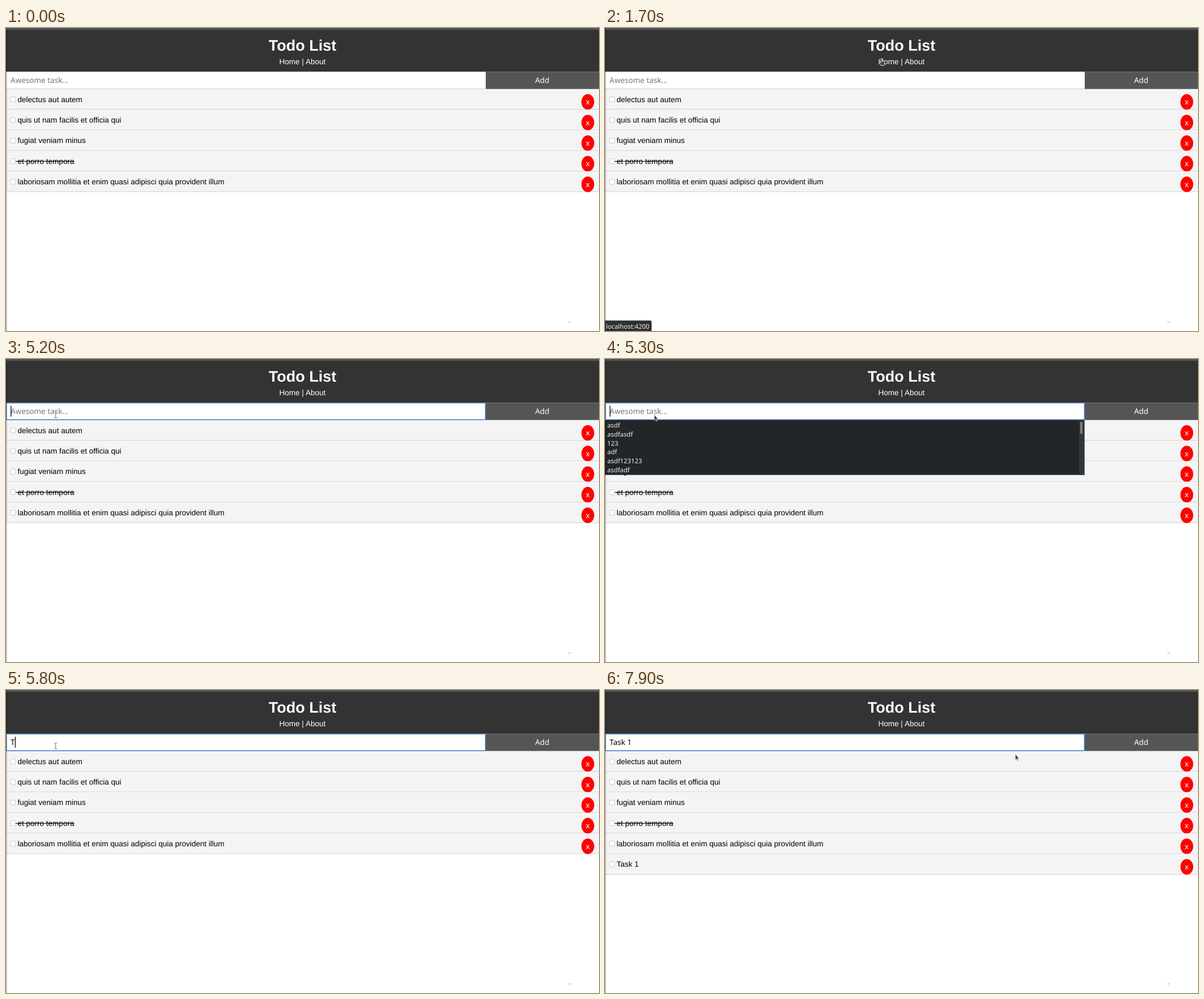
An HTML page for the animation above (8000 ms loop, 1047 by 535 pixels).

```html
<!DOCTYPE html>
<html lang="en">
<head>
<meta charset="utf-8">
<title>Todo List</title>
<style>
  html, body { margin: 0; width: 100%; height: 100%; overflow: hidden; background: #fff; }
  svg { display: block; width: 1047px; height: 535px; }
  text { text-rendering: geometricPrecision; white-space: pre; }
  .arial { font: 13.52px "Liberation Sans", Arial, sans-serif; }
  .title { font: bold 27px "Liberation Sans", Arial, sans-serif; }
  .noto { font: 13.5px "Noto Sans", "Open Sans", sans-serif; }
  .small { font: 11.3px "Noto Sans", "Open Sans", sans-serif; }
  .mid { text-anchor: middle; }
</style>
</head>
<body>
<svg viewBox="0 0 1047 535">
  <defs>
    <linearGradient id="edge">
      <stop offset="0" stop-color="#000" stop-opacity=".36"/>
      <stop offset="1" stop-color="#000" stop-opacity="0"/>
    </linearGradient>
  </defs>

  <rect width="1047" height="535" fill="#fff"/>
  <rect y="3" width="1047" height="74.3" fill="#333"/>
  <rect width="1047" height="3.4" fill="#4f5458"/>
  <text class="title mid" x="523.5" y="39.7" fill="#fff">Todo List</text>
  <text class="arial mid" x="523.4" y="63.7" fill="#fff">Home | About</text>

  <g id="rows"></g>

  <rect y="77.3" width="847" height="30.4" fill="#fff"/>
  <path d="M0 107.3H847" stroke="#bdbdbd" stroke-width=".8"/>
  <rect x="847" y="77.3" width="200" height="30.4" fill="#555"/>
  <text class="noto mid" x="946.8" y="97.2" fill="#fff">Add</text>
  <rect id="focus" x=".7" y="77.9" width="845.7" height="29.3" rx="1.4" fill="none" stroke="#3f80cc" stroke-width="1.4"/>
  <text id="hint" class="noto" x="8" y="97.2" fill="#757575">Awesome task...</text>
  <text id="typed" class="noto" x="8" y="97.2" fill="#000"></text>
  <rect id="caret" y="82.5" width="1.3" height="19.3" fill="#000"/>

  <g id="menu">
    <rect y="107.7" width="846.5" height="97" fill="#232629"/>
    <rect x="837" y="107.7" width="9.5" height="97" fill="#31363b"/>
    <rect x="839" y="111" width="4" height="21.5" rx="2" fill="#7d8083"/>
  </g>

  <rect x="993" y="518.4" width="4" height="1.1" fill="#aaa"/>
  <rect width="2.6" height="535" fill="url(#edge)"/>

  <g id="status">
    <path d="M0 516.5H79.5Q82.3 516.5 82.3 519.3V535H0Z" fill="#2d2f31"/>
    <text class="small" x="1.8" y="531" fill="#f4f4f4">localhost:4200</text>
  </g>

  <g id="pointer" stroke-linejoin="round">
    <path id="arrow" d="M.5 .3V10.6L2.8 8.6L4.5 12.1L6 11.4L4.4 8H7Z" fill="#3b3e42" stroke="#e4e4e4" stroke-width=".7"/>
    <g id="beam" fill="none">
      <path d="M-3 -5H3M0 -5V5M-3 5H3" stroke="#fff" stroke-width="2"/>
      <path d="M-2.7 -5H-.8L0 -4.3L.8 -5H2.7M0 -4.3V4.3M-2.7 5H-.8L0 4.3L.8 5H2.7" stroke="#55585b" stroke-width=".9"/>
    </g>
    <path id="hand" d="M-1.2 8V1.2Q-1.2 .1 0 .1T1.2 1.2V5L4.6 5.7Q5.8 6 5.7 7.4L4.9 11V13H-1.4V11.4L-4.6 8.2Q-4.8 6.6 -3.2 6.8Z" fill="#44474b" stroke="#e6e6e6" stroke-width=".9"/>
  </g>
</svg>

<script>
const LOOP = 8000, PITCH = 36.35, TOP = 107.7;
const $ = id => document.getElementById(id);

function add(parent, tag, attrs, text = "") {
  const el = document.createElementNS("http://www.w3.org/2000/svg", tag);
  for (const key in attrs) el.setAttribute(key, attrs[key]);
  el.textContent = text;
  return parent.appendChild(el);
}

function addRow(label, i) {
  const row = add($("rows"), "g", { transform: `translate(0 ${TOP + i * PITCH})` });
  add(row, "rect", { width: 1047, height: PITCH, fill: "#f4f4f4" });
  add(row, "rect", { y: PITCH - 0.9, width: 1047, height: 0.9, fill: "#ccc" });
  add(row, "rect", { x: 8, y: 14, width: 8.8, height: 8.8, rx: 1.6, fill: "#fff", stroke: "#bcbcbc", "stroke-width": 0.8 });
  add(row, "text", { class: "arial", x: 20.5, y: 22.9 }, label);
  if (i === 3) add(row, "rect", { x: 17, y: 18.2, width: 103.6, height: 1, fill: "#000" });
  add(row, "ellipse", { cx: 1027.2, cy: 22.9, rx: 11.3, ry: 13.8, fill: "#f00" });
  add(row, "text", { class: "noto mid", x: 1027.2, y: 27.5, fill: "#fff" }, "x");
  return row;
}

const rows = [
  "delectus aut autem",
  "quis ut nam facilis et officia qui",
  "fugiat veniam minus",
  "et porro tempora",
  "laboriosam mollitia et enim quasi adipisci quia provident illum",
  "Task 1"
].map(addRow);

["asdf", "asdfasdf", "123", "adf", "asdf123123", "asdfadf"].forEach((word, i) =>
  add($("menu"), "text", { class: "small", x: 4, y: 121 + i * 15.75, fill: "#eff0f1" }, word));

// Each track is a list of [start ms, ...values].
const pointer = [
  [0, "", 0, 0],
  [800, "arrow", 3, 300], [900, "arrow", 60, 232], [1000, "arrow", 160, 160],
  [1100, "beam", 270, 98], [1200, "arrow", 370, 64], [1300, "arrow", 440, 50],
  [1400, "arrow", 476, 45], [1500, "hand", 487, 50], [1600, "hand", 488.4, 53.4],
  [2200, "arrow", 440, 60], [2300, "beam", 250, 86], [2400, "beam", 125, 95],
  [2500, "beam", 87.7, 98.7], [5300, "arrow", 86.5, 98], [5800, "beam", 87.7, 98.7],
  [7700, "arrow", 712, 115.8], [7900, "arrow", 724, 113]
];
const typing = [[0, ""], [5800, "T"], [5900, "Ta"], [6100, "Task"], [6400, "Task "], [6500, "Task 1"]];
const blink = [[0, 0], [3200, 1], [4400, 0], [5200, 1], [5600, 0], [5800, 1], [6800, 0]];
const status = [[0, 0], [1600, 0.6], [1700, 1], [2300, 0.7], [2400, 0.35], [2500, 0.06], [3200, 0]];

const at = (track, t) => track.findLast(step => step[0] <= t).slice(1);
const show = (el, on) => el.setAttribute("visibility", on ? "visible" : "hidden");

function draw(t) {
  const [kind, x, y] = at(pointer, t);
  for (const id of ["arrow", "beam", "hand"]) show($(id), id === kind);
  $("pointer").setAttribute("transform", `translate(${x} ${y})`);

  const [value] = at(typing, t);
  const typed = $("typed");
  if (typed.textContent !== value) typed.textContent = value;
  show($("hint"), !value);
  $("caret").setAttribute("x", 8.2 + (value ? typed.getComputedTextLength() : 0));
  show($("caret"), at(blink, t)[0]);

  show($("focus"), t >= 3200);
  show($("menu"), t >= 5300 && t < 5800);
  show(rows[5], t >= 7600);
  $("status").setAttribute("opacity", at(status, t)[0]);
}

const start = performance.now();
function tick() {
  draw((performance.now() - start) % LOOP);
  requestAnimationFrame(tick);
}
tick();
</script>
</body>
</html>
```
